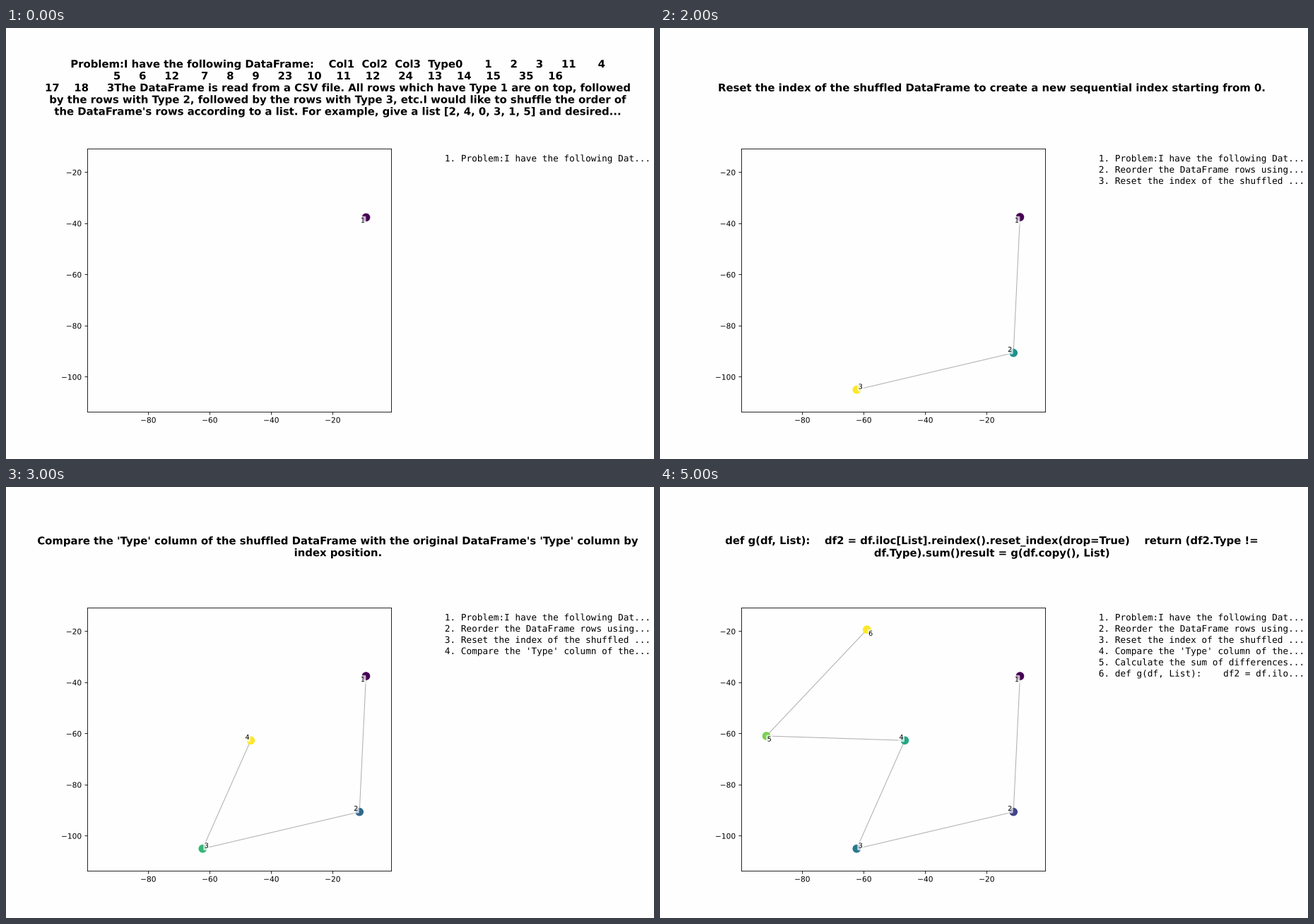
Animation of 917 by 611 pixels, one loop 6000 ms. Source, as a matplotlib script:

```python
import matplotlib.pyplot as plt
import numpy as np
from matplotlib.animation import FuncAnimation
from matplotlib.patheffects import Normal

W, H, DPI = 917, 611, 76.4
EPS = 1e-6  # guards the pixel size against rounding down

plt.rcParams["font.family"] = "DejaVu Sans"
plt.rcParams["text.hinting"] = "none"

STEPS = [
    "Problem:I have the following DataFrame:    Col1  Col2  Col3  Type0"
    "      1     2     3     11      4\n"
    "5     6     12      7     8     9     23    10    11    12     24"
    "    13    14    15     35    16\n"
    "17    18     3The DataFrame is read from a CSV file. "
    "All rows which have Type 1 are on top, followed\n"
    "by the rows with Type 2, followed by the rows with Type 3, etc."
    "I would like to shuffle the order of\n"
    "the DataFrame's rows according to a list. "
    "For example, give a list [2, 4, 0, 3, 1, 5] and desired...",
    "Reorder the DataFrame rows using the provided list of indices "
    "to shuffle them.",
    "Reset the index of the shuffled DataFrame to create a new "
    "sequential index starting from 0.",
    "Compare the 'Type' column of the shuffled DataFrame with the "
    "original DataFrame's 'Type' column by\nindex position.",
    "Calculate the sum of differences between the two 'Type' columns "
    "to get the count of rows with\ndifferent Types.",
    "def g(df, List):    df2 = df.iloc[List].reindex()"
    ".reset_index(drop=True)    return (df2.Type !=\n"
    "df.Type).sum()result = g(df.copy(), List)",
]

POINTS = np.array([
    (-9.17, -37.55), (-11.3, -90.64), (-62.3, -105.03),
    (-46.67, -62.7), (-91.68, -60.96), (-58.97, -19.36),
])
# Baseline offset of each number from its dot, in pixels
OFFSETS = [(-4.5, -7.7), (-5, 1.6), (5.4, 1.2),
           (-4.8, 1.4), (4.2, -7.6), (5.3, -8.6)]

fig = plt.figure(figsize=((W + EPS) / DPI, (H + EPS) / DPI), dpi=DPI,
                 facecolor="#fefefe")
ax = fig.add_axes([0.125, 0.11, 0.4697, 0.61], facecolor="#fefefe")

low, high = POINTS.min(axis=0), POINTS.max(axis=0)
margin = 0.1 * (high - low)
ax.set_xlim(low[0] - margin[0], high[0] + margin[0])
ax.set_ylim(low[1] - margin[1], high[1] + margin[1])
ax.set_xticks(range(-80, 0, 20))
ax.set_yticks(range(-100, 0, 20))

smooth = [Normal()]  # draws glyphs as outlines at sub-pixel positions
for tick in ax.get_xticklabels() + ax.get_yticklabels():
    tick.set_path_effects(smooth)


def put_text(x, y, text, **style):
    """Place text by its baseline, in pixels from the top left."""
    return fig.text(x / W, 1 - y / H, text, va="baseline",
                    path_effects=smooth, **style)


title = [put_text(469.96, 0, "", ha="center", size=14, weight="bold")
         for _ in range(5)]
rows = [put_text(620.8, 189.2 + 15.89 * i,
                 f"{i + 1}. {step.replace(chr(10), ' ')[:32]}...",
                 size=12, family="DejaVu Sans Mono")
        for i, step in enumerate(STEPS)]

path, = ax.plot([], [], color="black", alpha=0.3, lw=1, zorder=2)
dots = ax.scatter([], [], s=100, zorder=2.5)
box = dict(boxstyle="round,pad=0.15", fc="white", ec="none", alpha=0.7)
numbers = [ax.annotate(str(i + 1), point, xytext=offset,
                       textcoords="offset pixels", ha="center",
                       va="baseline", size=9, bbox=box, path_effects=smooth)
           for i, (point, offset) in enumerate(zip(POINTS, OFFSETS))]


def show_title(step):
    lines = step.split("\n")
    gap = 17.6 if "_" in step else 16.8
    top = 89.7 - gap * (len(lines) - 1) / 2
    for i, slot in enumerate(title):
        slot.set_text(lines[i] if i < len(lines) else "")
        slot.set_y(1 - (top + gap * i) / H)


def update(n):
    show_title(STEPS[n])
    seen = POINTS[:n + 1]
    path.set_data(seen[:, 0], seen[:, 1])
    dots.set_offsets(seen)
    dots.set_color(plt.cm.viridis(np.linspace(0, 1, n + 1)))
    for i, (row, number) in enumerate(zip(rows, numbers)):
        row.set_visible(i <= n)
        number.set_visible(i <= n)
    return [*title, *rows, *numbers, path, dots]


anim = FuncAnimation(fig, update, frames=len(STEPS), interval=1000,
                     init_func=lambda: update(0), repeat=True)
plt.show()
```
